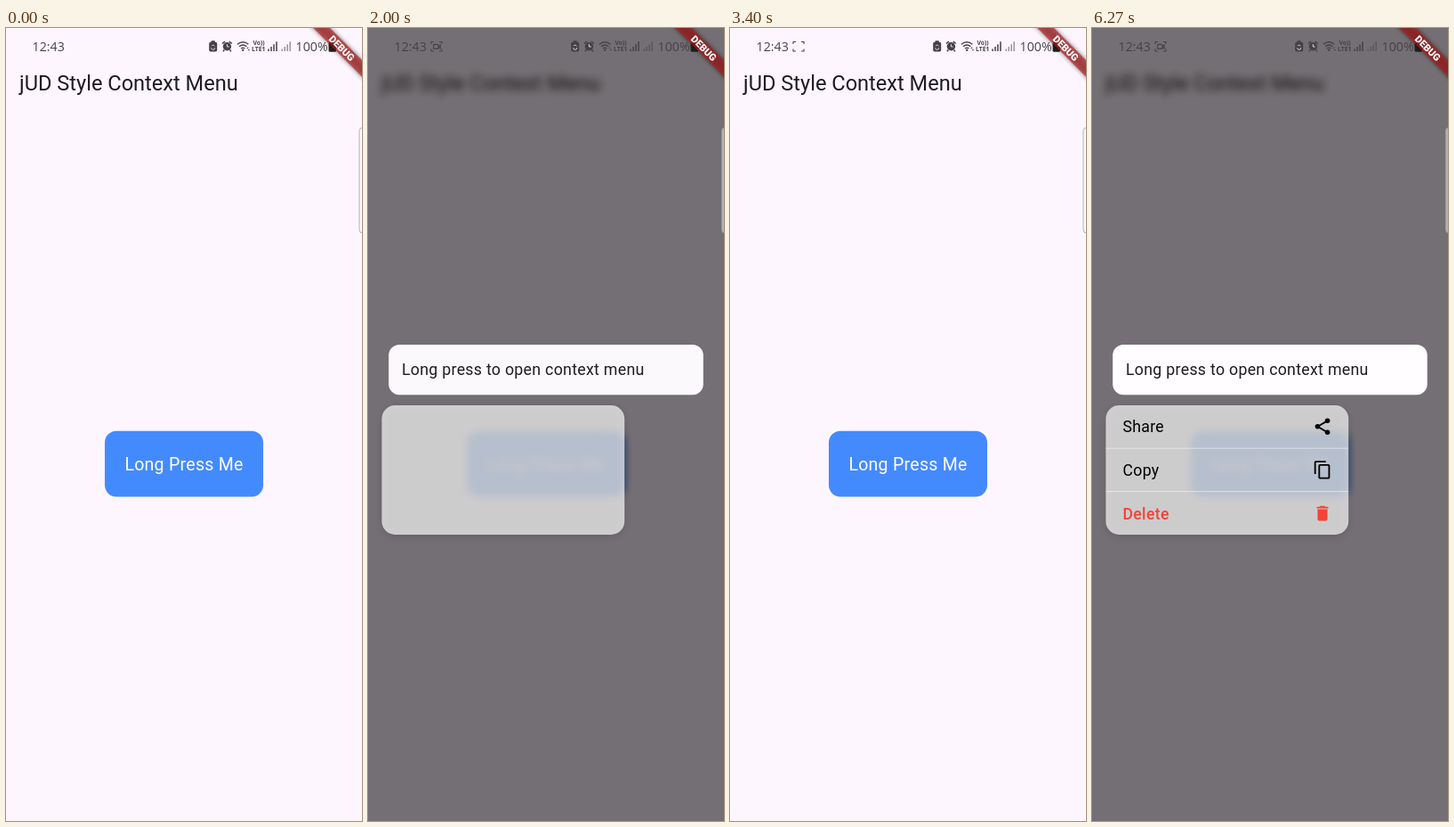
An HTML page that plays this animation: 400 by 889 pixels, repeating every 6.6 s.

```html
<!DOCTYPE html>
<html lang="en">
<head>
<meta charset="utf-8">
<title>Context menu</title>
<style>
  html, body { margin: 0; width: 100%; height: 100%; overflow: hidden; background: #fef6ff; }
  svg { display: block; width: 100%; height: 100%; }
  text { font-family: Roboto, sans-serif; white-space: pre; }
  .spaced { letter-spacing: .28px; }
  .row text { font-size: 17.78px; }
  .status text { font-family: "Open Sans", "Noto Sans", sans-serif; font-size: 14.2px; }
</style>
</head>
<body>
<svg viewBox="0 0 400 889" preserveAspectRatio="none">
  <rect width="400" height="889" fill="#fef6ff"/>
  <g id="page">
    <text x="15" y="69.8" font-size="23.6" fill="#1d1b20">jUD Style Context Menu</text>
    <rect x="111" y="451.7" width="178" height="73.8" rx="13" fill="#448aff"/>
    <text class="spaced" x="133.4" y="495.6" font-size="19.5" fill="#fff">Long Press Me</text>
  </g>

  <rect id="dim" width="400" height="889" fill="#020000"/>
  <g id="panel">
    <rect x="15.5" y="425" width="272.7" height="145" rx="15" fill="#000" opacity=".12" style="filter:blur(4px)" id="shadow"/>
    <clipPath id="panelClip"><rect x="15.5" y="423" width="272.7" height="145" rx="15"/></clipPath>
    <rect x="15.5" y="423" width="272.7" height="145" rx="15" fill="#fff" id="glass"/>
  </g>
  <g id="header">
    <rect x="23.3" y="355" width="353.4" height="56.2" rx="12" fill="#fffdff"/>
    <text class="spaced" x="38" y="389.2" font-size="17.78" fill="#1d1b20">Long press to open context menu</text>
  </g>
  <g clip-path="url(#panelClip)">
    <g class="row spaced">
      <text x="34.4" y="453.2">Share</text>
      <g transform="translate(247.9 435.7) scale(.926)">
        <path d="M18 5L6 12l12 7" fill="none" stroke="#000" stroke-width="2"/>
        <circle cx="18" cy="5" r="3"/><circle cx="6" cy="12" r="3"/><circle cx="18" cy="19" r="3"/>
      </g>
      <path d="M15.5 471.2h272.7" stroke="#fff" stroke-opacity=".5"/>
    </g>
    <g class="row spaced">
      <text x="34.4" y="501.8">Copy</text>
      <g transform="translate(247.9 484.3) scale(.926)" fill="none" stroke="#000" stroke-width="2">
        <path d="M16 2H4Q3 2 3 3V17"/><rect x="8" y="6" width="12" height="16" rx="1"/>
      </g>
      <path d="M15.5 519.6h272.7" stroke="#fff" stroke-opacity=".5"/>
    </g>
    <g class="row spaced" fill="#f44336">
      <text x="34.4" y="550.6" font-weight="500">Delete</text>
      <path transform="translate(247.9 533) scale(.926)" d="M6 19c0 1.1.9 2 2 2h8c1.1 0 2-.9 2-2V7H6zM19 4h-3.5l-1-1h-5l-1 1H5v2h14z"/>
    </g>
  </g>

  <rect x="397" y="111.5" width="12" height="118.5" rx="4" fill="#fff" fill-opacity=".45" stroke="#77727a" stroke-opacity=".55"/>

  <g class="status" fill="#454247">
    <text x="29.6" y="26">12:43</text>
    <text x="325.6" y="26">100%</text>
    <g id="recorder" fill="none" stroke="#454247" stroke-width="1.1">
      <path d="M71 18v-2.5h3M80 15.5h3V18M83 23.5V26h-3M74 26h-3v-2.5"/>
      <g id="camera"><rect x="73.7" y="18.4" width="5.3" height="5" rx="1"/><path d="M79 20.7l2.3-1.7v4L79 21.3"/></g>
    </g>
    <rect x="228.2" y="15.8" width="9" height="10.7" rx="1.8"/>
    <rect x="230.5" y="14.3" width="4.4" height="2" rx=".6"/>
    <path d="M230.7 22.3a2 2 0 0 0 4 0M231 20.2a2 2 0 0 1 3.4 0" fill="none" stroke="#fff" stroke-opacity=".8"/>
    <circle cx="248.4" cy="20.7" r="4.7"/>
    <path d="M243 17.5l3-2.4M253.8 17.5l-3-2.4M245.2 24.5l-1.2 1.7M251.6 24.5l1.2 1.7" stroke="#454247" stroke-width="1.6"/>
    <path d="M248.4 18v3h2.3" fill="none" stroke="#fff" stroke-opacity=".8"/>
    <g fill="none" stroke="#454247" stroke-width="1.4">
      <path d="M260 18.3q6.2-5.2 12.4 0M262 20.7q4.2-3.4 8.4 0M264 23q2.2-1.7 4.4 0"/>
    </g>
    <circle cx="266.2" cy="24.8" r="1.2"/>
    <path d="M270.2 23l1.3-1.6 1.3 1.6zM271.6 24l1.3 1.6 1.3-1.6z"/>
    <text x="277.4" y="19.3" style="font-size:6.8px;font-weight:700">Vo))</text>
    <text x="276" y="26.3" style="font-size:6.8px;font-weight:700">LTE1</text>
    <path id="bars" d="M295 26v-2.5M298 26v-5M301 26v-7.7M304 26v-10.7" stroke="#454247" stroke-width="1.5"/>
    <use href="#bars" x="15.2" opacity=".55"/>
    <rect x="362.5" y="15.8" width="8.5" height="11" rx="1.6" fill="#222"/>
    <rect x="364.7" y="14.3" width="4" height="2" fill="#222"/>
  </g>

  <g transform="translate(400 0) rotate(45)">
    <rect x="-44.4" y="25.4" width="88.8" height="13.3" fill="#000" opacity=".5" style="filter:blur(2.6px)"/>
    <rect x="-44.4" y="25.4" width="88.8" height="13.3" fill="#b71c1c" fill-opacity=".63"/>
    <text y="36" font-size="11" font-weight="900" fill="#fff" text-anchor="middle">DEBUG</text>
  </g>
</svg>
<script>
const LOOP = 6600;
const FADE = 250;
// Each opening: start of its fade, first visible moment, start of closing, first closing moment.
const openings = [
  { start: 1460, show: 1665, close: 3145, hide: 3195 },
  { start: 4367, show: 4390, close: Infinity, hide: Infinity }
];
const HEADER = { delay: 210, length: 340 };
const ROW = { delay: 540, stagger: 100, length: 300, slide: 10 };

const $ = id => document.getElementById(id);
const rows = document.querySelectorAll('.row');
const clamp = v => Math.min(1, Math.max(0, v));
const easeOut = v => 1 - (1 - v) ** 3;
const easeOutBack = v => 1 + 2.70158 * (v - 1) ** 3 + 1.70158 * (v - 1) ** 2;

function drawMenu(t) {
  const menu = openings.find(o => t >= o.show && t < o.close + FADE);
  const age = menu ? t - menu.start : 0;
  const closing = menu && t >= menu.hide;
  const fade = !menu ? 0 : clamp(closing ? 1 - (t - menu.close) / FADE : age / FADE);

  // The backdrop blur only works once the route is fully opaque.
  $('page').style.filter = fade === 1 ? 'blur(5px)' : 'none';
  $('dim').setAttribute('opacity', .545 * fade ** .73);
  $('glass').setAttribute('opacity', .68 * fade);
  $('shadow').setAttribute('opacity', .12 * fade);

  const h = clamp((age - HEADER.delay) / HEADER.length);
  const scale = .8 + .2 * easeOutBack(h);
  $('header').setAttribute('opacity', h * fade);
  $('header').setAttribute('transform', `translate(200 383.1) scale(${scale}) translate(-200 -383.1)`);

  rows.forEach((row, i) => {
    const r = clamp((age - ROW.delay - i * ROW.stagger) / ROW.length);
    row.setAttribute('opacity', r * fade);
    row.setAttribute('transform', `translate(0 ${ROW.slide * (1 - easeOut(r))})`);
  });
}

function drawRecorder(t) {
  const blink = (t + 130) % 1000;
  $('recorder').setAttribute('opacity', clamp((t - 30) / 170));
  $('camera').setAttribute('opacity', blink < 530 || t > 6200 ? 1 : 0);
}

function draw(now) {
  const t = now % LOOP;
  drawMenu(t);
  drawRecorder(t);
}

const origin = performance.now();
function tick() {
  draw(performance.now() - origin);
  requestAnimationFrame(tick);
}
tick();
</script>
</body>
</html>
```
